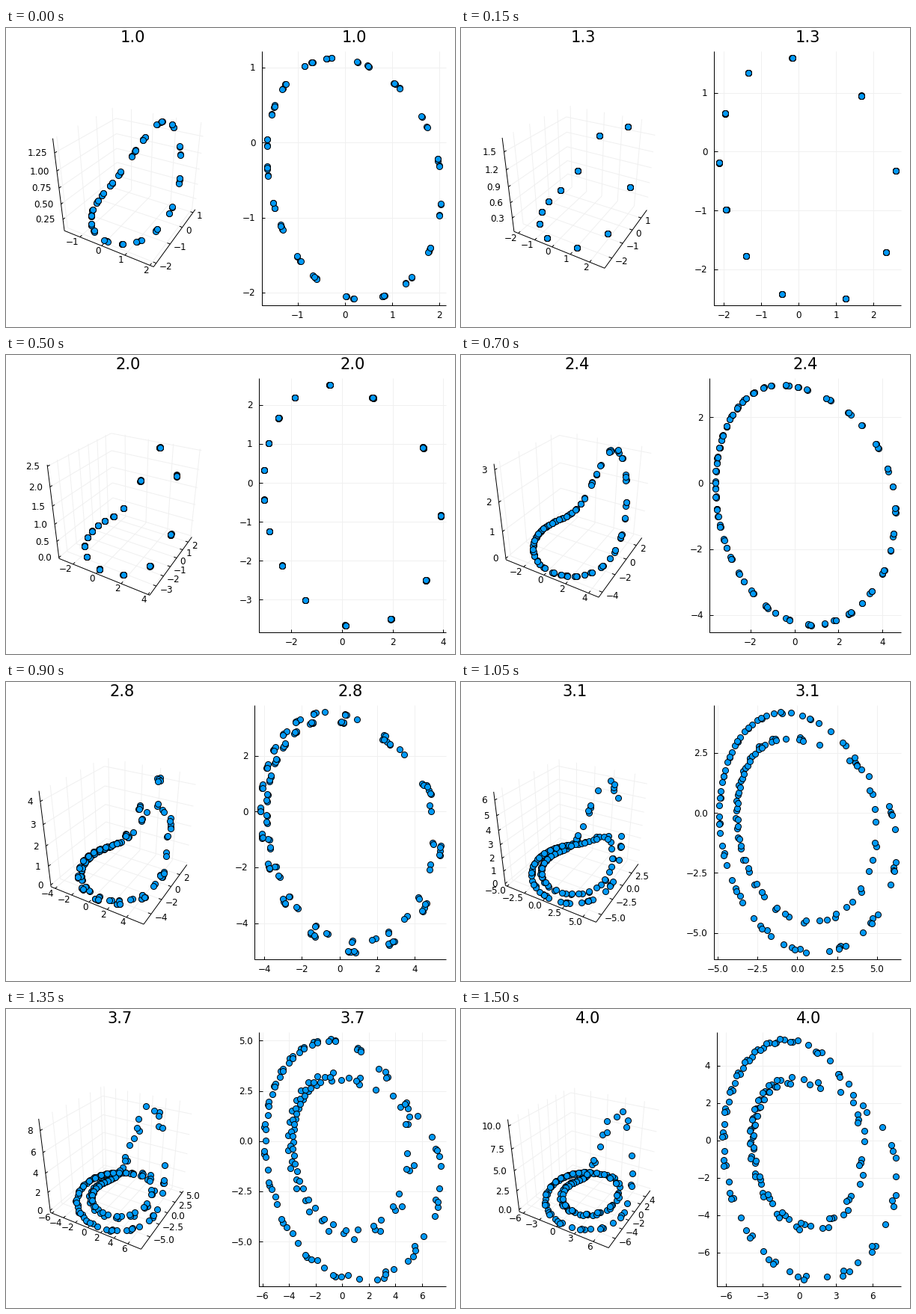
Animation of 600x400 px, one loop 1.55 s. Source, as a matplotlib script:

```python
import math

import numpy as np
import matplotlib.pyplot as plt
from matplotlib.animation import FuncAnimation

W, H = 600, 400
PX = 0.72                      # points per pixel at 100 dpi
TOP, BOTTOM, RIGHT = 30.8, 371.4, 588
MID = (TOP + BOTTOM) / 2
FONT, TITLE = 12, 21
FRAMES = 31


def tsit5():
    """Stage and error weights, solved from the order conditions."""
    solve = np.linalg.solve
    c = np.array([0, 0.161, 0.327, 0.9, 0.9800255409045097, 1, 1])
    a = np.zeros((7, 7))
    a[2, 1], a[3, 2] = 0.335480655492357, 4.3622954328695815

    powers = np.vander(c, 5, increasing=True).T
    b = np.full(6, 0.01)
    free = [0, 2, 3, 4, 5]
    b[free] = solve(powers[:, free], 1 / np.arange(1, 6) - b[1] * powers[:, 1])
    s = b * (1 - c[:6])

    p = a @ c
    p[3:5] = solve([s[3:5], s[3:5] * c[3:5]],
                   [1 / 24 - s[2] * p[2], 1 / 40 - s[2] * c[2] * p[2]])
    a[3, 1] = (p[3] - a[3, 2] * c[2]) / c[1]
    q, r = a @ c ** 2, a @ p
    a[4, 1:4] = solve([c[1:4], c[1:4] ** 2, p[1:4]],
                      [p[4], (1 / 60 - s[:4] @ q[:4]) / s[4],
                       (1 / 120 - s[:4] @ r[:4]) / s[4]])
    a[5, 1:5] = (s[1:5] - b[:5] @ a[:5, 1:5]) / b[5]
    a[6, :6] = b
    a[:, 0] = c - a[:, 1:].sum(axis=1)

    p = a @ c
    m = np.vstack([powers[:4], p, a @ p])
    err = np.append(solve(m[:, :6], -m[:, 6] / 66), 1 / 66)
    return a, err


A, ERR = tsit5()


def roessler(u, c, a=0.2, b=0.2):
    x, y, z = u
    return np.array([-y - z, x + a * y, b + z * (x - c)])


def orbit(c, t_skip=50, t_end=100, rtol=1e-3, atol=1e-6):
    """Accepted steps of an adaptive run after the transient."""
    u, t, dt, err_old = np.ones(3), 0.0, 0.01, 1e-4
    k = np.zeros((7, 3))
    k[0] = roessler(u, c)
    points = []
    while t < t_end:
        for i in range(1, 7):
            new = u + dt * (A[i, :i] @ k[:i])
            k[i] = roessler(new, c)
        scale = atol + rtol * np.maximum(abs(u), abs(new))
        err = math.sqrt(np.mean((dt * (ERR @ k) / scale) ** 2))
        grow = max(err, 1e-12) ** 0.14
        if err > 1:
            dt /= min(5, grow / 0.9)
            continue
        t, u = t + dt, new
        k[0] = k[6]
        dt /= min(5, max(0.1, grow / err_old ** 0.08 / 0.9))
        err_old = max(err, 1e-4)
        if t > t_skip:
            points.append(u)
    return np.array(points)


def pick_ticks(lo, hi):
    """Best scoring round ticks, with their labels."""
    nice = {5: 0.9, 3: 0.2, 2.5: 0.5, 2: 0.7, 1: 1.0}
    best, ticks, step = -1, [], 1
    for power in (1, 0, -1, -2):
        for q, quality in nice.items():
            s = q * 10.0 ** power
            first, last = math.ceil(lo / s), math.floor(hi / s)
            n = last - first + 1
            if not 4 <= n <= 8:
                continue
            score = (0.25 * (1 - abs(n - 5) / 5) + (first <= 0 <= last) / 6
                     + 0.5 * (hi - lo) / ((n - 1) * s) + 0.25 * quality)
            if score > best + 1e-9:
                best, step = score, s
                ticks = [i * s for i in range(first, last + 1)]
    digits = next(d for d in range(4)
                  if abs(step * 10 ** d - round(step * 10 ** d)) < 1e-6)
    labels = [f"{v:.{digits}f}".replace("-", "\u2212") for v in ticks]
    return ticks, labels


def label_width(labels):
    advance = {".": 0.318, "\u2212": 0.838}
    return FONT * max(sum(advance.get(ch, 0.636) for ch in s) for s in labels)


class Axis:
    def __init__(self, values):
        lo, hi = values.min(), values.max()
        pad = 0.03 * (hi - lo)
        self.lo, self.hi = lo - pad, hi + pad
        self.ticks, self.labels = pick_ticks(self.lo, self.hi)

    def unit(self, v):
        return (v - self.lo) / (self.hi - self.lo)

    def marks(self):
        return [(self.unit(v), s) for v, s in zip(self.ticks, self.labels)]


def project(p, cx, width):
    """Perspective view (30 degree field) of the unit cube, in pixels."""
    p = 2 * np.asarray(p, float) - 1
    h = math.sqrt(3) / 2
    right = p @ [h, 0.5, 0]
    up = p @ [-0.25, h / 2, h]
    depth = math.sqrt(3) / math.sin(math.pi / 12) + p @ [-h / 2, 0.75, -0.5]
    scale = width / 2 / math.tan(math.pi / 12)
    return cx + scale * right / depth, MID - scale * up / depth


fig = plt.figure(figsize=(W / 100, H / 100), dpi=100, facecolor="white")
ax = fig.add_axes([0, 0, 1, 1])


def line(xs, ys, grid=False):
    ax.plot(xs, ys, color="#f0f0f0" if grid else "black", lw=PX,
            zorder=1 if grid else 2, solid_capstyle="butt")


def text(x, y, s, ha="center", size=FONT):
    ax.text(x, y + 0.365 * size, s, ha=ha, va="baseline", fontsize=size * PX,
            family="DejaVu Sans", zorder=2)


def dots(x, y):
    ax.scatter(x, y, s=(8 * PX) ** 2, c="#009AF9", edgecolors="black",
               linewidths=PX, zorder=3, snap=False)


def draw_space(pts, axes, cx, width):
    def seg(p, q, grid=False):
        xs, ys = project([p, q], cx, width)
        line(xs, ys, grid)

    def label(p, dx, dy, s, ha):
        x, y = project(p, cx, width)
        text(x + dx, y + dy, s, ha)

    ax_x, ax_y, ax_z = axes
    tick = 0.03
    for t, s in ax_x.marks():
        seg((t, 0, 0), (t, 1, 0), True)
        seg((t, 1, 0), (t, 1, 1), True)
        seg((t, 0, 0), (t, tick, 0))
        label((t, 0, 0), -1.5, 6, s, "right")
    for t, s in ax_y.marks():
        seg((0, t, 0), (1, t, 0), True)
        seg((0, t, 0), (0, t, 1), True)
        seg((1, t, 0), (1 - tick, t, 0))
        label((1, t, 0), 4.5, 4, s, "left")
    for t, s in ax_z.marks():
        seg((0, 0, t), (0, 1, t), True)
        seg((0, 1, t), (1, 1, t), True)
        seg((0, 0, t), (0, tick, t))
        label((0, 0, t), -10, 0, s, "right")
    seg((0, 0, 0), (1, 0, 0))
    seg((1, 0, 0), (1, 1, 0))
    seg((0, 0, 0), (0, 0, 1))
    unit = np.column_stack([a.unit(pts[:, i]) for i, a in enumerate(axes)])
    dots(*project(unit, cx, width))


def draw_plane(pts, ax_x, ax_y, left):
    def to_x(t):
        return left + t * (RIGHT - left)

    def to_y(t):
        return BOTTOM - t * (BOTTOM - TOP)

    for t, s in ax_x.marks():
        x = to_x(t)
        line([x, x], [TOP, BOTTOM], True)
        line([x, x], [BOTTOM, BOTTOM - 4.5])
        text(x, 383.5, s)
    for t, s in ax_y.marks():
        y = to_y(t)
        line([left, RIGHT], [y, y], True)
        line([left, left + 4.5], [y, y])
        text(left - 8.5, y, s, "right")
    line([left, left, RIGHT], [TOP, BOTTOM, BOTTOM])
    dots(to_x(ax_x.unit(pts[:, 0])), to_y(ax_y.unit(pts[:, 1])))


def draw(i):
    ax.cla()
    ax.set_xlim(0, W)
    ax.set_ylim(H, 0)
    ax.axis("off")
    pts = orbits[i]
    axes = [Axis(pts[:, j]) for j in range(3)]
    pad = 19.5 + label_width(axes[2].labels)
    gap = 31.9 + label_width(axes[1].labels)
    width = (RIGHT - pad - gap) / 2
    cx, left = pad + width / 2, RIGHT - width
    draw_space(pts, axes, cx, width)
    draw_plane(pts, axes[0], axes[1], left)
    for x in (cx, (left + RIGHT) / 2):
        text(x, 11.2, f"{1 + i / 10:.1f}", size=TITLE)
    return []


orbits = [orbit(1 + i / 10) for i in range(FRAMES)]
anim = FuncAnimation(fig, draw, frames=FRAMES, interval=50, repeat=True)
plt.show()
```
